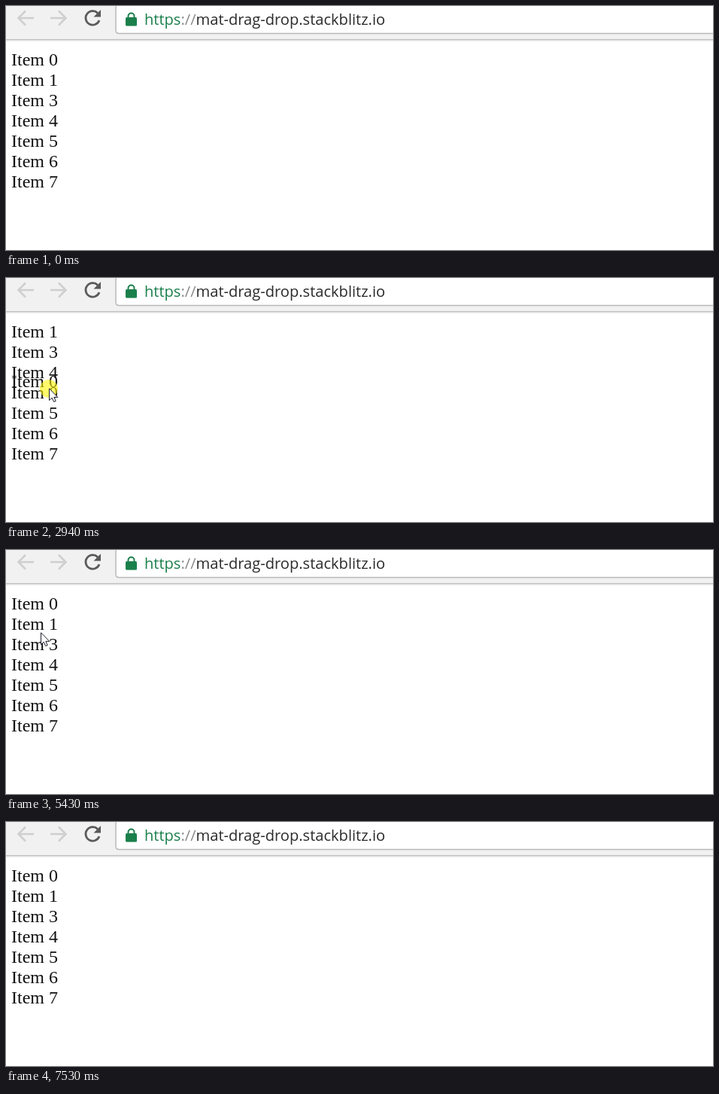
Write an HTML page with a canvas that moves like this. It is 940 by 324 pixels and loops after 8080 ms.

```html
<!DOCTYPE html>
<html lang="en">
<head>
<meta charset="utf-8">
<title>Drag and drop list</title>
<style>
  html, body { margin: 0; height: 100%; overflow: hidden; background: #fff; }
  canvas { display: block; }
</style>
</head>
<body>
<canvas id="stage" width="940" height="324"></canvas>
<script>
const ctx = document.getElementById('stage').getContext('2d');
const LOOP = 8080, STEP = 77, LEFT = 7, TOP = 58, ROW = 27;
const labels = [0, 1, 3, 4, 5, 6, 7].map(n => 'Item ' + n);

// Key points of the pointer's path
const path = [
  [70, 485, 278], [840, 58, 233], [990, 58, 233], [1620, 50, 132], [1940, 48, 131],
  [2240, 57, 80], [2400, 57, 80], [2940, 57, 146], [3730, 50, 222], [4270, 52, 208],
  [4650, 593, 190], [5430, 46, 109], [5660, 7, 86], [6140, 733, 142], [6370, 670, 249],
  [6830, 16, 230], [7230, 622, 240], [7530, 750, 318]
].map(([t, x, y]) => ({ t, x, y }));

const drags = [
  { index: 6, press: 920, start: 990, drop: 1790 },
  { index: 0, press: 2320, start: 2400, drop: 3880 }
];

// Speed at a key point; zero where the motion turns or rests
function speed(i, axis) {
  const [a, b, c] = [path[i - 1], path[i], path[i + 1]];
  if (!a || !c) return 0;
  const before = (b[axis] - a[axis]) / (b.t - a.t);
  const after = (c[axis] - b[axis]) / (c.t - b.t);
  return before * after > 0 ? 2 * before * after / (before + after) : 0;
}

// Smooth curve through the key points, advancing in screen updates
function pointerAt(t) {
  const i = Math.min(path.length - 2, Math.max(0, path.findLastIndex(p => p.t <= t)));
  const from = path[i], to = path[i + 1], span = to.t - from.t;
  const elapsed = Math.floor((t - from.t + 8) / STEP) * STEP;
  const k = Math.min(1, Math.max(0, elapsed / span));
  const along = axis => Math.round(
    from[axis] + (to[axis] - from[axis]) * k * k * (3 - 2 * k) +
    span * k * (1 - k) * (speed(i, axis) * (1 - k) - speed(i + 1, axis) * k));
  return { x: along('x'), y: along('y') };
}

function text(str, x, y, font, color) {
  ctx.font = font;
  ctx.fillStyle = color;
  ctx.fillText(str, x, y);
  return x + ctx.measureText(str).width;
}

function item(label, x, top) {
  text(label, x, top + 21, '24px "Liberation Serif", serif', '#111');
}

function stroke(d, color, width) {
  ctx.strokeStyle = color;
  ctx.lineWidth = width;
  ctx.stroke(new Path2D(d));
}

function fill(d, color) {
  ctx.fillStyle = color;
  ctx.fill(new Path2D(d));
}

function toolbar() {
  fill('M0 0H940V44H0Z', '#f1f1f1');
  fill('M0 44H940V45.5H0Z', '#bdbdbd');
  fill('M0 45.5H940V47H0Z', '#ececec');

  const address = 'M146 -5V32Q146 36.5 150.5 36.5H945V-5Z';
  fill(address, '#fff');
  stroke(address, '#b9b9b9', 1.5);

  stroke('M37 16H17M26 6.5L16.5 16L26 25.5', '#cfcfcf', 2.6);
  stroke('M59 16H79M70 6.5L79.5 16L70 25.5', '#cfcfcf', 2.6);
  stroke('M122 9.5A9.3 9.3 0 1 0 124 19', '#5a5a5a', 2.7);
  fill('M126 5V14.5H116.5Z', '#5a5a5a');

  const green = '#1a7f4b';
  fill('M160.5 15H172.5Q174 15 174 16.5V25Q174 26.5 172.5 26.5H160.5Q159 26.5 159 25V16.5Q159 15 160.5 15Z', green);
  stroke('M162.5 16V13.5A4 4 0 0 1 170.5 13.5V16', green, 2);

  const font = '20.1px "Open Sans", sans-serif';
  let x = text('https', 184, 25, font, green);
  x = text('://', x, 25, font, '#8a8a8a');
  text('mat-drag-drop.stackblitz.io', x, 25, font, '#2a2a2a');
}

function list(t, pointer, drag) {
  const order = [...labels];
  const dragging = drag && t >= drag.start;
  if (dragging) {
    const row = Math.min(6, Math.max(0, Math.floor((pointer.y - TOP) / ROW)));
    order.splice(row, 0, ...order.splice(drag.index, 1));
  }
  order.forEach((label, i) => item(label, LEFT, TOP + i * ROW));
  if (dragging) {
    const grab = pointerAt(drag.press);
    item(labels[drag.index], LEFT + pointer.x - grab.x, TOP + drag.index * ROW + pointer.y - grab.y);
  }
}

function highlight({ x, y }) {
  ctx.fillStyle = 'rgba(255, 245, 0, 0.58)';
  ctx.beginPath();
  ctx.arc(x, y + 1, 12, 0, Math.PI * 2);
  ctx.fill();
}

function arrow({ x, y }) {
  const shape = 'M.5 .8V16.5L4.2 13.2L6.7 18.5L9.2 17.4L6.8 12.3H11.8Z';
  ctx.save();
  ctx.translate(x, y);
  fill(shape, '#fff');
  stroke(shape, '#1c1c28', 1);
  ctx.restore();
}

function draw(t) {
  const pointer = pointerAt(t);
  const drag = drags.find(d => t >= d.press && t < d.drop);
  const visible = t >= 70 && t < 7530 && !(t >= 1790 && t < 1940);

  ctx.fillStyle = '#fff';
  ctx.fillRect(0, 0, 940, 324);
  toolbar();
  list(t, pointer, drag);
  if (drag) highlight(pointer);
  if (visible) arrow(pointer);
}

let origin;
function frame(now) {
  origin ??= now;
  draw((now - origin) % LOOP);
  requestAnimationFrame(frame);
}
requestAnimationFrame(frame);
</script>
</body>
</html>
```
